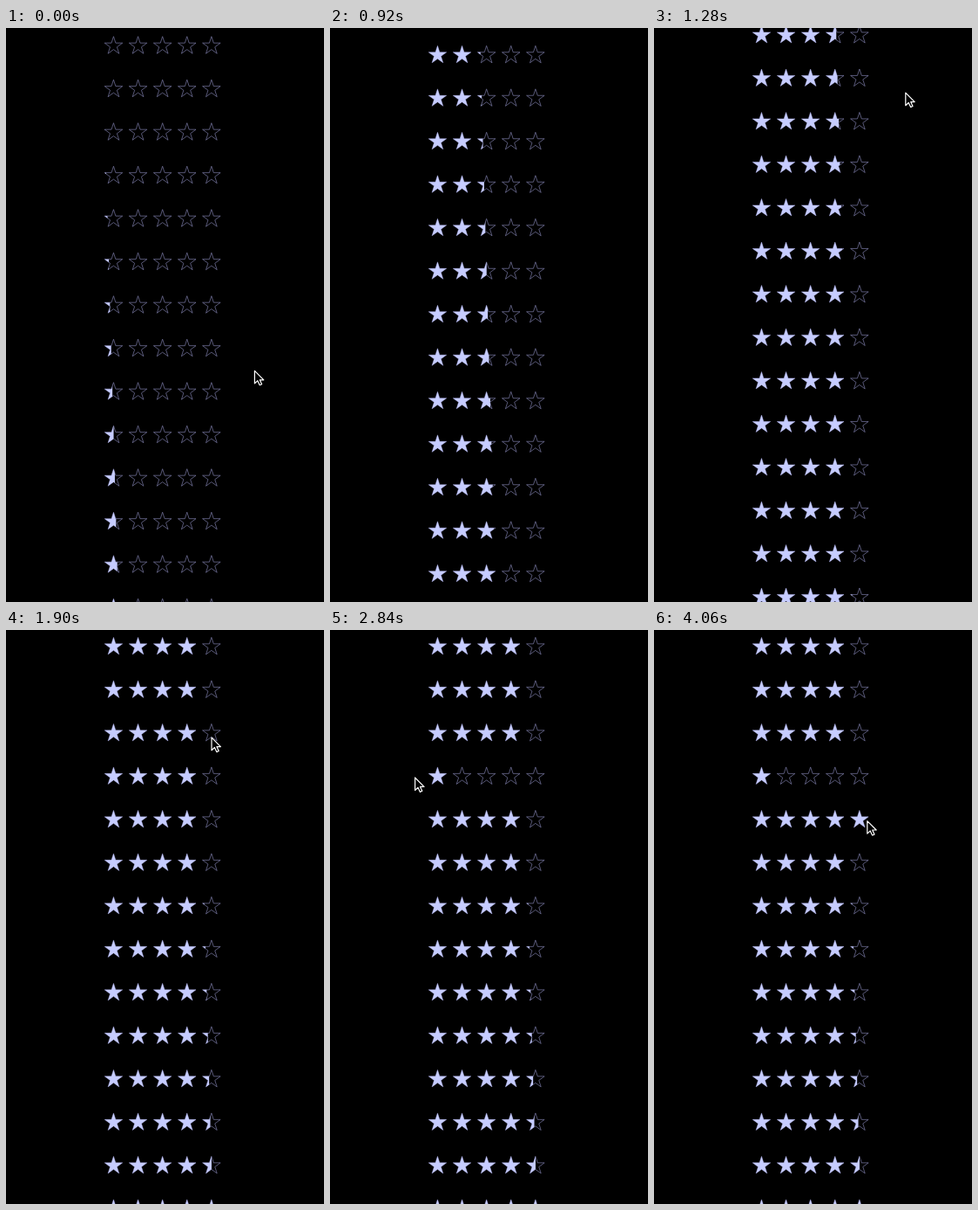
An HTML page that plays this animation: 365x657 px, repeating every 4.9 s.

```html
<!DOCTYPE html>
<html lang="en">
<head>
<meta charset="utf-8">
<title>Star ratings</title>
<style>
  html, body { margin: 0; width: 100%; height: 100%; overflow: hidden; background: #000; }
  svg { display: block; width: 100%; height: 100%; }
</style>
</head>
<body>
<svg viewBox="0 0 365 657" xmlns="http://www.w3.org/2000/svg">
  <defs id="defs">
    <path id="star"/>
    <g id="stars"></g>
  </defs>
  <g id="list"></g>
  <path id="cursor" d="M.6 .8V15.3L4 12.1L6.4 17.2L8.8 16.1L6.5 11.2H11Z"
        fill="#000" stroke="#fff" stroke-width="1.2" stroke-linejoin="round"/>
</svg>
<script>
const LOOP = 4900, ROW = 49.5, TOP = 20.5, LEFT = 109.4, PITCH = 28.1, SLOTS = 15;
const FILL_LEFT = LEFT + 1.5, SCROLL_END = 3812.8;
const $ = id => document.getElementById(id);
const clamp = (v, lo, hi) => Math.min(hi, Math.max(lo, v));

function make(tag, attrs, parent) {
  const el = document.createElementNS('http://www.w3.org/2000/svg', tag);
  for (const key in attrs) el.setAttribute(key, attrs[key]);
  parent.appendChild(el);
  return el;
}

function starPath(radius) {
  const points = Array.from({ length: 10 }, (_, i) => {
    const r = i % 2 ? radius * 0.382 : radius, a = i * Math.PI / 5;
    return (r * Math.sin(a)).toFixed(2) + ' ' + (-r * Math.cos(a)).toFixed(2);
  });
  return 'M' + points.join('L') + 'Z';
}

$('star').setAttribute('d', starPath(10.8));
for (let i = 0; i < 5; i++) {
  make('use', { href: '#star', x: LEFT + PITCH * (i + 0.5) }, $('stars'));
}

const slots = Array.from({ length: SLOTS }, (_, i) => {
  const row = make('g', {}, $('list'));
  const clip = make('clipPath', { id: 'fill' + i }, $('defs'));
  const rect = make('rect', { x: FILL_LEFT, y: -15, height: 30, width: 0 }, clip);
  make('use', { href: '#stars', fill: 'none', stroke: '#7d7daa', 'stroke-width': 0.7 }, row);
  const filled = make('g', { 'clip-path': `url(#fill${i})` }, row);
  make('use', { href: '#stars', fill: '#c6ccff' }, filled);
  return { row, rect };
});

// How many of `count` even steps from start to end are done at t.
function stepsDone(t, start, end, count) {
  if (t < start) return 0;
  if (t >= end) return count;
  return Math.floor((t - start) / (end - start) * (count - 1) + 1e-6) + 1;
}

// The list is redrawn in bursts: start, end, steps.
const bursts = [[450, 620, 4], [800, 920, 3], [1040, 1280, 4], [1430, 1430, 1]];

function lastRedraw(t) {
  const burst = bursts.filter(b => t >= b[0]).pop();
  if (!burst) return 0;
  const [start, end, count] = burst;
  if (count === 1) return start;
  return start + (end - start) * (stepsDone(t, start, end, count) - 1) / (count - 1);
}

// The flick speeds up until 620 ms, then slows down evenly to a stop.
function scrollAt(t) {
  const now = lastRedraw(t);
  if (now <= 620) return 767 * (Math.max(0, now - 390) / 230) ** 1.5;
  const u = now - 620;
  return Math.min(SCROLL_END, 767 + 5.136 * u - 0.00156 * u * u);
}

// Pointer moves: start, end, steps, x, y.
const home = [284.8, 391.6];
const moves = [
  [120, 210, 2, 284, 395],
  [1280, 1280, 1, 288.2, 73.4],
  [1670, 1900, 5, 235.4, 122.4],
  [1960, 2190, 4, 165, 155.6],
  [2250, 2720, 8, 102, 166.8],
  [2780, 2840, 2, 97, 168.2],
  [3020, 3370, 7, 122.3, 219.4],
  [3610, 4060, 9, 244.2, 217.8]
];

function cursorAt(t) {
  let [x, y] = home;
  for (const [start, end, count, toX, toY] of moves) {
    const p = stepsDone(t, start, end, count) / count;
    x += (toX - x) * p;
    y += (toY - y) * p;
  }
  return [x, y];
}

const touchRating = t => clamp((cursorAt(t)[0] + 2 - LEFT) / PITCH, 1, 5);

function ratingAt(index, t) {
  if (index === 80 && t >= 2250) return touchRating(Math.min(t, 2840));
  if (index === 81 && t >= 3610) return touchRating(t);
  return Math.min(5, index * 0.05);
}

function render(t) {
  const scroll = scrollAt(t);
  const first = Math.max(0, Math.floor((scroll - TOP - 12) / ROW));
  slots.forEach(({ row, rect }, i) => {
    const index = first + i;
    row.setAttribute('transform', `translate(0 ${(TOP + index * ROW - scroll).toFixed(2)})`);
    rect.setAttribute('width', (PITCH * ratingAt(index, t)).toFixed(2));
  });
  const [x, y] = cursorAt(t);
  $('cursor').setAttribute('transform', `translate(${x.toFixed(2)} ${y.toFixed(2)})`);
  $('cursor').setAttribute('visibility', t >= 450 && t < 1280 ? 'hidden' : 'visible');
}

const begin = performance.now();
function tick() {
  render((performance.now() - begin) % LOOP);
  requestAnimationFrame(tick);
}
tick();
</script>
</body>
</html>
```
